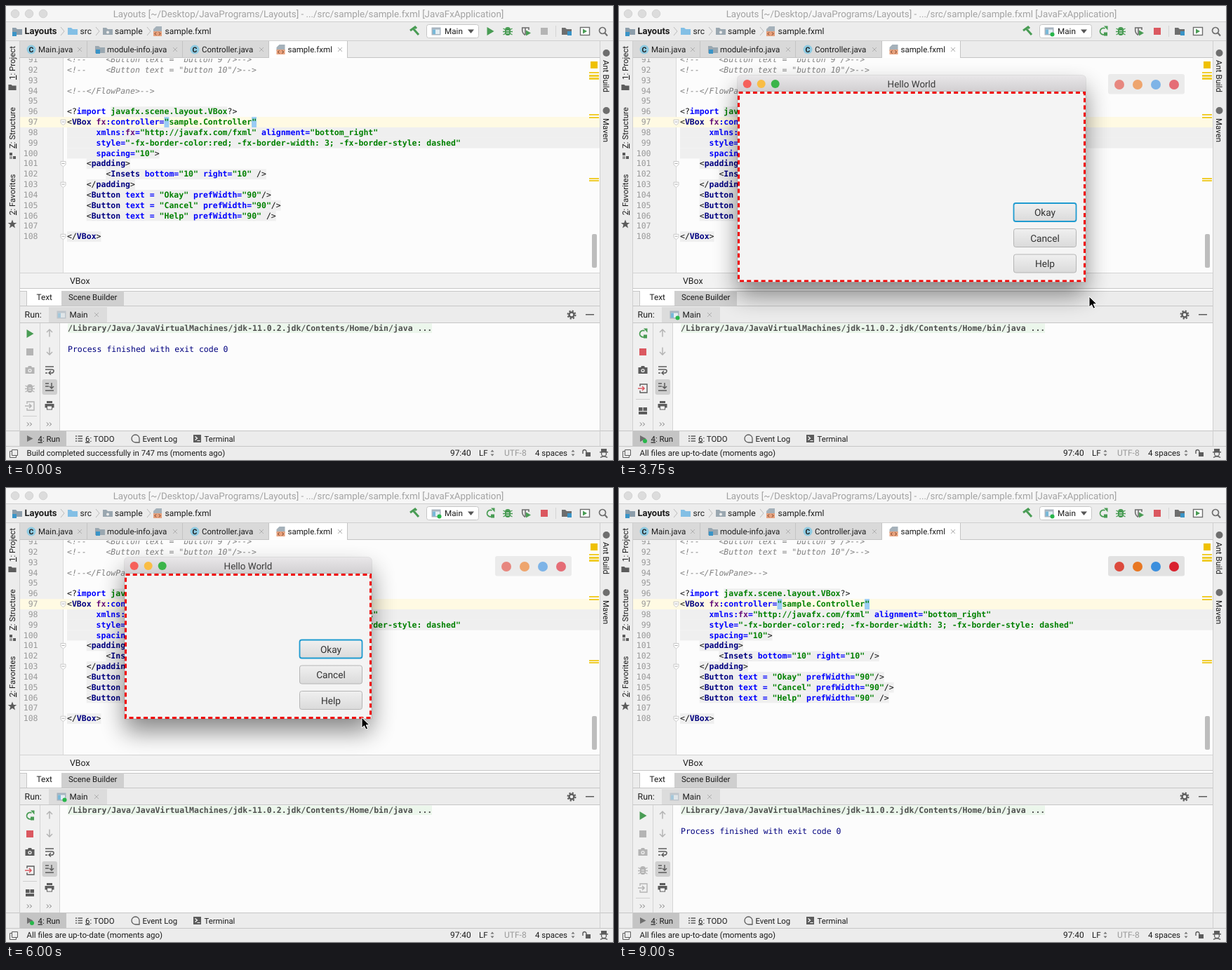
Write an HTML page that moves like this. It is 865 px wide and 647 px high and loops after 9250 ms.

```html
<!DOCTYPE html>
<html lang="en">
<head>
<meta charset="utf-8">
<title>Layouts</title>
<style>
html, body { margin: 0; width: 100%; height: 100%; overflow: hidden; background: #ececec; }
svg { display: block; position: absolute; left: 0; top: 0; }
text { font-family: Roboto, "Liberation Sans", sans-serif; fill: #1c1c1c; white-space: pre; text-rendering: geometricPrecision; }
.mono, .mono tspan { font-family: "DejaVu Sans Mono", monospace; font-size: 11.5px; }
.c { fill: #808080; font-style: italic; }
.p { fill: #111; }
.t { fill: #000080; font-weight: bold; }
.a { fill: #0000ff; font-weight: bold; }
.n { fill: #660e7a; font-weight: bold; }
.s { fill: #008000; font-weight: bold; }
.num { fill: #999; text-anchor: end; }
.u { text-decoration: underline; }
</style>
</head>
<body>
<svg id="stage" width="865" height="647" viewBox="0 0 865 647">
  <defs>
    <linearGradient id="bar" x2="0" y2="1"><stop stop-color="#e9e7e9"/><stop offset="1" stop-color="#d1cfd1"/></linearGradient>
    <linearGradient id="btn" x2="0" y2="1"><stop stop-color="#f0f0f0"/><stop offset="1" stop-color="#dadada"/></linearGradient>
    <filter id="soft" x="-40%" y="-60%" width="180%" height="240%"><feGaussianBlur stdDeviation="17"/></filter>
    <clipPath id="edit"><rect x="20" y="75" width="826" height="305"/></clipPath>
  </defs>
</svg>
<script>
const LOOP = 9250, STEP = 250;
const GREEN = '#499c54', RED = '#db5860', DARK = '#5c5c5c', PALE = '#b4b4b4', PAPER = '#fcfcfc';
const stage = document.getElementById('stage');

const esc = s => s.replace(/&/g, '&amp;').replace(/</g, '&lt;');
const rect = (x, y, w, h, fill, more = '') =>
  `<rect x="${x}" y="${y}" width="${w}" height="${h}" fill="${fill}" ${more}/>`;
const fillPath = (d, color) => `<path d="${d}" fill="${color}"/>`;
const line = (d, color, w = 1) => `<path d="${d}" fill="none" stroke="${color}" stroke-width="${w}"/>`;
const dot = (x, y, r, fill, more = '') => `<circle cx="${x}" cy="${y}" r="${r}" fill="${fill}" ${more}/>`;
const text = (x, y, s, size = 11.5, more = '') => `<text x="${x}" y="${y}" font-size="${size}" ${more}>${esc(s)}</text>`;
const hot = (x, y, s, more = '') =>
  `<text x="${x}" y="${y}" font-size="11.4" ${more}><tspan class="u">${s[0]}</tspan>${s.slice(1)}</text>`;
const at = (x, y, s) => `<g transform="translate(${x} ${y})">${s}</g>`;
const group = (id, s) => `<g id="${id}">${s}</g>`;

// Icons are centred on 0,0
const play = c => fillPath('M-4.5-6L5.5 0L-4.5 6Z', c);
const stop = c => rect(-5, -5, 10, 10, c);
const rerun = () => line('M3.6 3.5A4.7 4.7 0 1 1 2.5-4', GREEN, 1.8) +
  fillPath('M1-7.5H6.5V-1.5Z', GREEN) + rect(1, 1.5, 5, 5, GREEN);
const bug = c => fillPath('M-4-2Q-4-6 0-6T4-2V2Q4 6 0 6T-4 2Z', c) +
  line('M-6.5-4L-3-2M6.5-4L3-2M-7 .5H7M-6.5 5L-3 3M6.5 5L3 3', c, 1.4) + line('M-2-.5H2M-2 2.5H2', '#ececec', 1);
const camera = c => fillPath('M-6.5-4H-3L-2-6H2L3-4H6.5V5H-6.5Z', c) + dot(0, .5, 2.6, '#eee') + dot(0, .5, 1.3, c);
const exit = (c, frame) => line('M-4-3V-6H6V6H-4V3', frame, 1.4) + line('M-7 0H2M-1-3L2 0L-1 3', c, 1.6);
const folder = c => fillPath('M-7-5H-2L0-3H7V5H-7Z', c);
const panes = c => [[-6, -5], [.5, -5]].map(([x, y]) => rect(x, y, 5.5, 5, c)).join('') + rect(-6, 1, 12, 4, c);
const pin = c => fillPath('M1-6L6-1L4 0L2 2L1 5L-2 2L-6 6L-3 1L-5-1L-2-2L1-4Z', c);
const arrow = dir => line(`M0 ${5.5 * dir}V${-5 * dir}M-4 ${-1 * dir}L0 ${-5 * dir}L4 ${-1 * dir}`, PALE, 1.5);
const more = () => line('M-4-2.5L-1.5 0L-4 2.5M0-2.5L2.5 0L0 2.5', '#777', 1);
const close = () => line('M-3-3L3 3M3-3L-3 3', '#b0b0b0', 1);
const chevron = () => line('M-2-6L3 0L-2 6', '#bbb', 1);
const app = on => rect(-6.5, -5.5, 13, 11, '#a7b4bf') + rect(-5, -2.5, 10, 6.5, '#e3edf3') +
  rect(-5, -2.5, 4, 6.5, '#79b9d9') + (on ? dot(4.5, 4.5, 3, '#27b64a') : '');
const java = () => dot(0, 0, 6.5, '#8fcbe2') + text(-3.6, 4, 'C', 10.5, 'font-weight="bold"');
const fxml = () => fillPath('M-2-7H6V2H-6V-3Z', '#a5b1ba') + rect(-6, 0, 12, 7, '#e7a17d') +
  line('M-2 1.5L-4 3.5L-2 5.5M2 1.5L4 3.5L2 5.5', '#63331c', 1);
const gear = c => dot(0, 0, 3.5, 'none', `stroke="${c}" stroke-width="2.4"`) +
  dot(0, 0, 5.5, 'none', `stroke="${c}" stroke-width="2" stroke-dasharray="2.2 2.12"`);
const printer = c => rect(-4, -6, 8, 3, c) + rect(-6.5, -2, 13, 5.5, c) + rect(-3.5, 1, 7, 5, '#fff', `stroke="${c}"`);
const prompt = c => rect(-5.5, -5.5, 11, 11, c) + line('M-3-3L0-.5L-3 2M0 3H4', '#fff', 1.2);

// Code: tokens parted by |, first letter gives the colour
const CH = 6.923, ROW = 14.83, base = n => 95 + (n - 92) * ROW;
const button = (s, tail) => `    |p<|tButton |atext = |s"${s}"|a prefWidth=|s"90"|p${tail}`;
const code = {
  91: 'c<!--    <Button text = "button 9"/>-->',
  92: 'c<!--    <Button text = "button 10"/>-->',
  94: 'c<!--</FlowPane>-->',
  96: 'p<?|aimport |sjavafx.scene.layout.VBox|p?>',
  97: 'p<|tVBox |nfx|a:controller=|s"sample.Controller"',
  98: '      |axmlns:|nfx|a=|s"http://javafx.com/fxml"|a alignment=|s"bottom_right"',
  99: '      |astyle=|s"-fx-border-color:red; -fx-border-width: 3; -fx-border-style: dashed"',
  100: '      |aspacing=|s"10"|p>',
  101: '    |p<|tpadding|p>',
  102: '        |p<|tInsets |abottom=|s"10"|a right=|s"10"|p />',
  103: '    |p</|tpadding|p>',
  104: button('Okay', '/>'),
  105: button('Cancel', '/>'),
  106: button('Help', ' />'),
  108: 'p</|tVBox|p>'
};
function codeRow(n) {
  const y = base(n);
  let out = `<text class="mono num" x="45.5" y="${y}">${n}</text>`;
  if (!code[n]) return out;
  let col = 0, spans = '', indent = 0;
  for (const part of code[n].split('|')) {
    if (part[0] === ' ') { col += part.length; indent = col; continue; }
    spans += `<tspan class="${part[0]}">${esc(part.slice(1))}</tspan>`;
    col += part.length - 1;
  }
  const from = n === 100 ? 0 : indent, top = y - 11;
  let back = '';
  if (n === 98 || n === 99) back = rect(87, top, 759, ROW, '#efefef');
  else if (n === 96) back = rect(87 + 9 * CH, top, 24 * CH, ROW, '#efefef');
  else if (n > 99) back = rect(87 + from * CH, top, (col - from) * CH, ROW, '#efefef');
  else if (n === 97) back = rect(20, top, 826, ROW, '#fffae3') +
    [20, 38].map(k => rect(87 + k * CH, top, CH, ROW, '#99ccf5')).join('');
  return back + out + `<text class="mono" x="${87 + indent * CH}" y="${y}">${spans}</text>`;
}

function titleBar() {
  return group('titleOff', rect(0, 0, 865, 22, '#f6f6f6') +
      [13, 33, 53].map(x => dot(x, 11, 5.8, '#dcdcdc', 'stroke="#cfcfcf" stroke-width=".8"')).join('')) +
    group('titleOn', rect(0, 0, 865, 22, 'url(#bar)') +
      ['#fc5b57', '#fdbe40', '#34c84a'].map((c, i) => dot(13 + 20 * i, 11, 6, c)).join('')) +
    `<text id="title" x="431" y="15.5" font-size="13.35" text-anchor="middle">Layouts [~/Desktop/JavaPrograms/Layouts] - .../src/sample/sample.fxml [JavaFxApplication]</text>` +
    rect(0, 22, 865, 1, '#cfcfcf');
}

function navBar() {
  return at(16, 36, folder('#8c9daa') + rect(-7, 1, 6, 6, '#3a94c7')) + text(26.5, 39.5, 'Layouts', 13, 'font-weight="bold"') +
    at(80, 36, chevron()) + at(95, 36, folder('#83bfe5')) + text(105.5, 39.5, 'src', 12) +
    at(130, 36, chevron()) + at(145, 36, folder('#9aa7b0') + dot(0, 1.5, 2, '#ececec')) + text(155, 39.5, 'sample', 12.1) +
    at(203, 36, chevron()) + at(216, 36, fxml()) + text(226.5, 39.5, 'sample.fxml', 12) +
    at(582, 36, line('M-6-1L1-6L3-4M-2-4L6 5', GREEN, 3)) +
    rect(599.5, 26.5, 74, 19, '#fff', 'rx="3" stroke="#c6c6c6"') + text(625, 40, 'Main', 11.7) +
    fillPath('M658 33.5H667L662.5 39Z', '#555') +
    group('cfgOff', at(613, 36, app())) + group('cfgOn', at(613, 36, app(true))) +
    group('press', rect(680, 26, 20, 20, '#d2d2d2', 'rx="3"')) +
    group('topOff', at(690, 36, play(GREEN)) + at(767, 36, stop(PALE))) +
    group('topOn', at(690, 36, rerun()) + at(767, 36, stop(RED))) +
    at(715, 36, bug(GREEN)) +
    at(741, 36, line('M-1 5.5Q-5 3-5.3-1V-5H4V-2M-1-5V5', '#6e6e6e', 1.6) + fillPath('M0-1.5L7 2.5L0 6.5Z', GREEN)) +
    rect(783, 28, 1, 16, '#d4d4d4') +
    at(799, 36, folder('#6e6e6e') + rect(1, 0, 6, 6, '#3a94c7')) +
    at(825, 36, rect(-6.5, -5.5, 13, 11, '#fff', 'stroke="#6e6e6e" stroke-width="1.4"') + fillPath('M-3-3.5L3 0L-3 3.5Z', GREEN)) +
    at(850, 35, dot(0, 0, 4.5, 'none', 'stroke="#6e6e6e" stroke-width="1.7"') + line('M3 3L7 7.5', '#6e6e6e', 2)) +
    rect(0, 49, 865, 1, '#d0d0d0');
}

function tabs() {
  const list = [['Main.java', 20, 96, 46, java], ['module-info.java', 116, 136, 144, null],
    ['Controller.java', 252, 123, 279, java], ['sample.fxml', 375, 112, 401.5, fxml]];
  return list.map(([name, x, w, tx, icon], i) =>
    rect(x, 50, w, 24, i === 3 ? '#fff' : '#d9d9d9') + rect(x + w - 1, 50, 1, 24, '#c4c4c4') +
    at(tx - 10, 62, icon ? icon() : folder('#9aa7b0') + rect(-6, 0, 6, 6, '#3a94c7')) +
    text(tx, 65.5, name, 11.55) + at(x + w - 11, 62, close())).join('') +
    rect(20, 73, 355, 1, '#c4c4c4') + rect(487, 73, 359, 1, '#c4c4c4');
}

function editor() {
  let rows = '';
  for (let n = 91; n <= 108; n++) rows += codeRow(n);
  const marks = [[94, 2], [98, 3], [102, 3], [154, 2], [158, 2], [245, 2], [248, 2]];
  return rect(20, 74, 826, 306, PAPER) + rect(20, 74, 62, 306, '#f0f0f0') + rect(81, 74, 1, 306, '#d9d9d9') +
    `<g clip-path="url(#edit)">${rows}</g>` +
    [97, 101, 103, 108].map(n => at(81.5, base(n) - 3.5,
      '<path d="M-3.5-3.5H3.5V1L0 4L-3.5 1Z" fill="#fff" stroke="#c4c4c4" stroke-width=".9"/>' + line('M-2-.5H2', '#aaa'))).join('') +
    rect(833, 79, 10, 10, '#efc100') + marks.map(([y, h]) => rect(831, y, 14, h, '#f0cd2e')).join('') +
    rect(835, 325, 7, 48, '#bdbdbd', 'rx="2"') +
    group('caret', rect(357, 158, 2, 14.5, '#000'));
}

function lower() {
  const col2 = at(62, 466, arrow(1)) + at(62, 492, arrow(-1)) +
    at(62, 518, line('M-6-4H6M-6 0H3Q6.5 0 6 2.5T3 5H0M2 2L-1 5L2 7.5M-6 5H-3', DARK, 1.5)) +
    rect(51.5, 532, 21.5, 22, '#cfcfcf', 'rx="3"') +
    at(62, 543, line('M-6-5H-1M-6-1H-1M-6 5H6M3-6V2M0-1L3 2L6-1', DARK, 1.5)) +
    at(62, 569, printer(DARK)) + at(62, 596, more());
  const sep = y => rect(24, y, 20, 1, '#cfcfcf');
  const icon = (y, s) => at(34, y, s);
  const live = icon(467, rerun()) + icon(493, stop(RED)) + icon(519, camera(DARK));
  return rect(20, 380, 826, 1, '#d4d4d4') + rect(20, 381, 826, 22, '#f2f2f2') + text(91, 395.5, 'VBox', 12.3) +
    rect(20, 402, 826, 1, '#c6c6c6') + rect(20, 403, 826, 3, '#fff') + rect(20, 406, 826, 1, '#c6c6c6') +
    rect(30, 406, 49, 21, '#fff') + rect(79, 406, 89, 21, '#cfcfcf') + rect(29, 406, 1, 21, '#c6c6c6') +
    text(43.5, 418.5, 'Text', 11.8) + text(89, 418.5, 'Scene Builder', 11.45) +
    rect(20, 427, 826, 1, '#c6c6c6') + text(26.5, 444, 'Run:', 12.4) +
    rect(61, 429, 83, 22, '#dcdcdc') + text(90.5, 444, 'Main', 11.8) + at(129, 440, close()) +
    group('tabOff', `<g opacity=".55">${at(79, 440, app())}</g>`) + group('tabOn', at(79, 440, app(true))) +
    at(806, 440, gear(DARK)) + rect(826, 439, 12, 1.5, DARK) + rect(20, 451, 826, 1, '#c6c6c6') +
    rect(20, 452, 57, 153, '#f0f0f0') + rect(48, 452, 1, 153, '#d4d4d4') + rect(76, 452, 1, 153, '#d4d4d4') +
    rect(77, 452, 769, 153, PAPER) + col2 +
    group('idle', icon(467, play(GREEN)) + icon(493, stop(PALE)) + icon(519, camera(PALE)) + icon(545, bug(PALE)) +
      icon(570, exit(PALE, PALE)) + sep(584) + icon(596, more())) +
    group('begin', live + sep(536) + icon(551, panes(DARK)) + icon(583, pin(DARK))) +
    group('busy', live + icon(545, exit(RED, DARK)) + sep(560) + icon(577, panes(DARK)) + icon(596, more())) +
    group('late', live + icon(545, bug(GREEN)) + icon(570, exit(RED, DARK)) + sep(584) + icon(596, more())) +
    rect(88, 452.5, 519, 13.5, '#ebf6eb') +
    `<text class="mono" x="88" y="463" style="fill:#4f4f4f;font-weight:bold">/Library/Java/JavaVirtualMachines/jdk-11.0.2.jdk/Contents/Home/bin/java ...</text>` +
    `<text id="done" class="mono" x="88" y="493" style="fill:#00007f">Process finished with exit code 0</text>`;
}

function footer() {
  const spin = x => fillPath(`M${x - 2.5} 635.5L${x} 632.5L${x + 2.5} 635.5ZM${x - 2.5} 638.5L${x} 641.5L${x + 2.5} 638.5Z`, '#777');
  return rect(0, 605, 865, 1, '#c6c6c6') + rect(20, 606, 66, 21, '#c4c4c4') +
    at(34, 616.5, fillPath('M-4-4.5L4.5 0L-4 4.5Z', '#6e6e6e')) + group('runDot', dot(37, 620, 3, '#27b64a')) +
    hot(45.5, 620.5, '4: Run') +
    at(104, 616.5, line('M-5-3.5H-3M-5 0H-3M-5 3.5H-3M-1.5-3.5H5M-1.5 0H5M-1.5 3.5H5', DARK, 1.5)) + hot(113, 620.5, '6: TODO') +
    at(184.5, 616.5, line('M5.5 5.5H0A5.5 5.5 0 1 1 5.5 0Z', DARK, 1.3)) + text(194.5, 620.5, 'Event Log', 11.4) +
    at(272.5, 616.5, prompt(DARK)) + text(282.5, 620.5, 'Terminal', 11.3) +
    rect(0, 627, 865, 1, '#c6c6c6') +
    line('M8.5 632.5H16.5V640.5H8.5ZM8.5 634.5H5.5V643.5H14.5V640.5', DARK) +
    group('built', text(29.5, 641, 'Build completed successfully in 747 ms (moments ago)', 11.45)) +
    group('fresh', text(29.5, 641, 'All files are up-to-date (moments ago)', 11.55)) +
    text(633, 641, '97:40', 11.9) + text(674, 641, 'LF', 11.5) + spin(693) +
    text(710, 641, 'UTF-8', 12, 'style="fill:#9a9a9a"') + text(754, 641, '4 spaces', 11.5) + spin(808) +
    at(827, 637, rect(-1, -1, 7, 6, DARK) + line('M-5 1V-2A2.5 2.5 0 0 1 0-2V0', DARK, 1.4)) +
    at(852, 637, fillPath('M-4-6H4V-2H6V-.5H-6V-2H-4Z', DARK) + dot(0, 1, 3.5, 'none', `stroke="${DARK}" stroke-width="1.3"`) +
      line('M-5 6.5Q0 3 5 6.5', DARK, 1.5));
}

function sides() {
  const up = (y, s) => hot(0, 0, s, `transform="translate(13 ${y}) rotate(-90)"`);
  const down = (y, s) => text(0, 0, s, 11.5, `transform="translate(851 ${y}) rotate(90)"`);
  return rect(19, 50, 1, 577, '#cfcfcf') + rect(846, 50, 1, 577, '#cfcfcf') +
    up(105, '1: Project') + at(9, 116, `<g transform="scale(.8)">${folder(DARK)}</g>`) +
    up(203, 'Z: Structure') + at(9, 213, rect(-4, -4, 4, 4, DARK) + rect(1, 1, 4, 4, DARK) + rect(-4, 1, 4, 4, '#999')) +
    up(298, '2: Favorites') + at(9, 311, fillPath('M0-6.5L1.8-2H6.3L2.7.8L4 5.5L0 2.8L-4 5.5L-2.7.8L-6.3-2H-1.8Z', DARK)) +
    dot(855.5, 67, 5, '#6e6e6e') + down(77, 'Ant Build') + dot(855.5, 149, 5, '#6e6e6e') + down(160, 'Maven');
}

const popup = rect(697, 97, 109, 28.5, '#e2e2e2', 'rx="3"') +
  ['#dc4a3d', '#e87722', '#3c8fdd', '#d9222f'].map((c, i) => dot(713 + 26 * i, 112, 7, c)).join('');
const pointer = '<path d="M0 0V15L3.5 11.8L6 17.2L8.6 16L6.2 10.8H11Z" fill="#000" stroke="#fff" stroke-width="1"/>';

stage.insertAdjacentHTML('beforeend', rect(0, 0, 865, 647, '#ececec') + titleBar() + navBar() + tabs() +
  editor() + lower() + footer() + sides() + group('popup', popup) + group('dialog', '') + group('cursor', pointer));

// Dashed frame with a whole number of dashes around it
function dashes(x, y, w, h) {
  const around = 2 * (w + h), k = around / Math.floor(around / 10.2) / 10.2;
  return rect(x, y, w, h, 'none', `stroke="#f00000" stroke-width="3" stroke-dasharray="${6 * k} ${4.2 * k}"`);
}

function dialog(w, h, hover) {
  const x = 169, y = 99, r = x + w, b = y + h;
  const lights = [hover ? '#b8423f' : '#f6605a', '#f9bd45', '#3cb54a'];
  const signs = ['M-2.3-2.3L2.3 2.3M2.3-2.3L-2.3 2.3', 'M-3.2 0H3.2', 'M-2.2 2.2L2.2-2.2M-2.5-.5V2.5H.5M2.5.5V-2.5H-.5'];
  const names = ['Okay', 'Cancel', 'Help'];
  return rect(x, y + 18, w, h, '#000', 'rx="5" opacity=".46" filter="url(#soft)"') +
    `<path d="M${x} ${b}V${y + 5}q0-5 5-5H${r - 5}q5 0 5 5V${b}Z" fill="#f4f4f4" stroke="#000" stroke-opacity=".15"/>` +
    `<path d="M${x} 122V${y + 5}q0-5 5-5H${r - 5}q5 0 5 5V122Z" fill="url(#bar)"/>` + rect(x, 121, w, 1, '#b8b8b8') +
    lights.map((c, i) => at(182.7 + 20 * i, 111, dot(0, 0, 6, c) + (hover ? line(signs[i], '#4a1a08', 1.2) : ''))).join('') +
    text(x + w / 2, 115.5, 'Hello World', 13.4, 'text-anchor="middle" style="fill:#3a3a3a"') +
    `<clipPath id="pane"><rect x="${x}" y="122" width="${w}" height="${b - 122}"/></clipPath><g clip-path="url(#pane)">` +
    dashes(x + 1.5, 123.5, w - 3, b - 125) +
    names.map((s, i) => {
      const top = b - 39.5 - 36.5 * (2 - i), edge = i ? '#b5b5b5' : '#1f9bd0';
      return rect(r - 102.5, top, 89, 26, 'url(#btn)', `rx="3" stroke="${edge}" stroke-width="${i ? 1 : 1.8}"`) +
        text(r - 58, top + 18, s, 13.7, 'text-anchor="middle" style="fill:#333"');
    }).join('') + '</g>';
}

// Rows: time, then values
const path = [[250, 610, 330], [750, 678, 90], [1250, 684, 36], [2750, 684, 36], [3750, 670, 414], [4000, 662, 394],
  [5000, 449, 225], [5500, 449, 225], [6000, 507, 327], [6750, 507, 327], [8000, 175, 111], [LOOP, 175, 111]];
const sizes = [[3000, 496, 294.5], [4000, 496, 294.5], [5000, 285, 114], [5500, 285, 114], [6000, 352, 230], [LOOP, 352, 230]];

function along(rows, t) {
  const i = rows.findIndex(r => r[0] > t);
  if (i < 1) return rows[i < 0 ? rows.length - 1 : 0].slice(1);
  const a = rows[i - 1], b = rows[i], k = (t - a[0]) / (b[0] - a[0]);
  return [1, 2].map(j => a[j] + (b[j] - a[j]) * k);
}

const el = id => document.getElementById(id);
const show = (id, on) => { el(id).style.display = on ? '' : 'none'; };
const flip = (name, on) => { show(name + 'On', on); show(name + 'Off', !on); };

function draw(t) {
  const active = t >= 750 && t < 3000;
  const open = t >= 3000 && t < 8500;
  const ended = t < 1750 || t >= 8750;
  flip('title', active);
  el('title').style.fill = active ? '#3c3c3c' : '#a2a2a2';
  show('caret', active && Math.floor(t / 500) % 2 === 1);
  show('press', t >= 1250 && t < 3000);
  flip('top', t >= 1750);
  flip('cfg', t >= 1750);
  flip('tab', !ended);
  show('runDot', !ended);
  show('done', ended);
  show('idle', ended);
  show('begin', !ended && t < 3000);
  show('busy', !ended && t >= 3000 && t < 6750);
  show('late', !ended && t >= 6750);
  show('built', t < 2000);
  show('fresh', t >= 2000);
  show('popup', t >= 3500);
  el('popup').setAttribute('opacity', t < 5500 || (t >= 5750 && t < 6500) ? .65 : 1);
  el('dialog').innerHTML = open ? dialog(...along(sizes, t), t >= 8000) : '';
  show('cursor', t >= 250 && t < 8750);
  el('cursor').setAttribute('transform', `translate(${along(path, t)})`);
}

let last = -1;
const start = performance.now();
function tick(now) {
  const t = Math.floor(Math.max(0, now - start) % LOOP / STEP) * STEP;
  if (t !== last) draw(last = t);
  requestAnimationFrame(tick);
}
tick(start);
</script>
</body>
</html>
```
